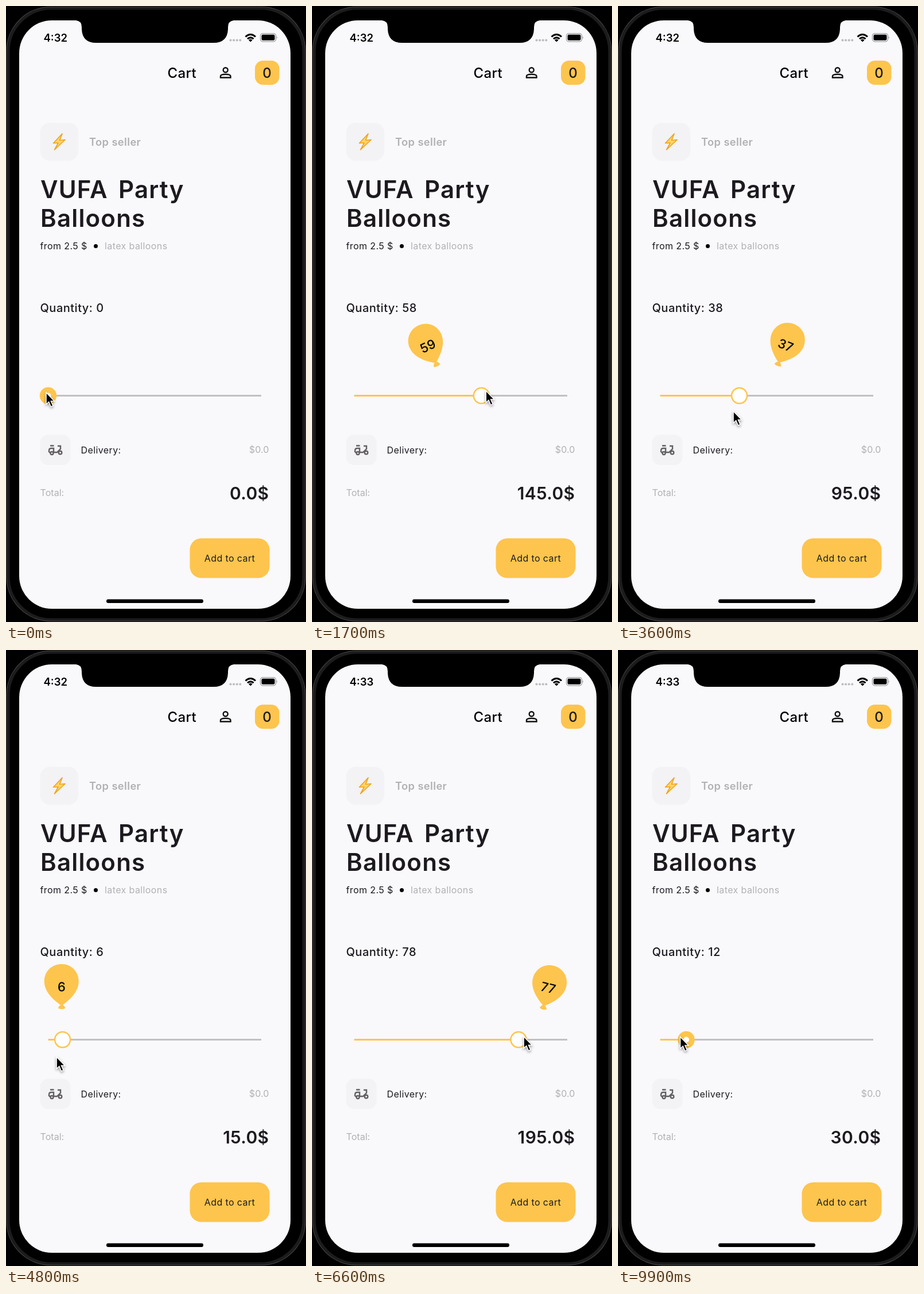
An HTML page that plays this animation: 523x1071 px, repeating every 10000 ms.

```html
<!DOCTYPE html>
<html lang="en">
<head>
<meta charset="utf-8">
<title>Balloon slider</title>
<style>
  html, body { margin: 0; width: 100%; height: 100%; overflow: hidden; background: #000; }
  svg { display: block; width: 523px; height: 1071px; }
  text { font: 400 16px Inter, sans-serif; letter-spacing: .4px; fill: #1c1a1f; white-space: pre; }
  .muted { fill: #b2b0b4; }
  .end { text-anchor: end; letter-spacing: .1px; }
  .mid { text-anchor: middle; letter-spacing: 0; }
  .title { font-size: 42px; font-weight: 600; letter-spacing: 1.2px; }
  .tile { fill: #f3f2f4; }
  .gold { fill: #fdc54d; }
  .line { fill: none; stroke-width: 2.4; }
</style>
</head>
<body>
<svg viewBox="0 0 523 1071">
  <!-- Phone -->
  <rect width="523" height="1071"/>
  <rect class="line" x="4" y="4" width="515" height="1063" rx="75" style="stroke:#1c1c1d;stroke-width:5"/>
  <rect class="line" x="1" y="1.5" width="521" height="1068" rx="77" style="stroke:#48484a;stroke-width:1.2"/>
  <rect x="23" y="25" width="473" height="1023" rx="57" fill="#f9f8fb"/>
  <path d="M122 24H397V25Q387 26 387 37V40Q386 64 362 64H157Q133 64 132 40V37Q132 26 122 25Z"/>
  <rect x="175" y="1031.5" width="169" height="6.5" rx="3.2"/>

  <!-- Status bar -->
  <text id="clock" x="65.5" y="62" style="font-size:18.5px;font-weight:600;letter-spacing:0;fill:#000"></text>
  <path d="M391.5 59.5H410" stroke="#bdbcbf" stroke-width="4.2" stroke-dasharray="0 5.6" stroke-linecap="round"/>
  <g fill="none" stroke="#000" stroke-width="3">
    <path d="M417.5 53.5Q426.300 45.500 435 53.500"/>
    <path d="M421 57.200Q426.300 52.500 431.600 57.200"/>
  </g>
  <path d="M426.300 62.500L423 59.200Q426.300 56.500 429.600 59.200Z"/>
  <rect x="443.500" y="47.800" width="27" height="14" rx="4" fill="none" stroke="#97969a" stroke-width="1.200"/>
  <rect x="445.500" y="49.800" width="23" height="10" rx="2.200"/>
  <path d="M471.800 52.500Q474 54.800 471.800 57Z" fill="#97969a"/>

  <!-- Header -->
  <text x="281.500" y="125" style="font-size:24px;font-weight:500;fill:#000">Cart</text>
  <g class="line" stroke="#111">
    <circle cx="382.700" cy="111.300" r="4"/>
    <path d="M374 124.500V122C374 117.600 391.500 117.600 391.500 122V124.500Z"/>
  </g>
  <rect class="gold" x="434" y="95" width="42.500" height="42" rx="14"/>
  <text class="mid" x="455" y="125" style="font-size:24px;font-weight:500">0</text>

  <!-- Product -->
  <rect class="tile" x="59.500" y="203" width="66.500" height="66" rx="17"/>
  <path d="M98 222L82.500 238.500L91 238L84.500 250L103 232.500L93.500 233.500Z" fill="#ffd56a" stroke="#eda51d" stroke-width="1.700" stroke-linejoin="round"/>
  <text class="muted" x="145" y="243" style="font-size:18.300px;font-weight:600">Top seller</text>
  <text class="title" x="60" y="334">VUFA</text>
  <text class="title" x="196" y="334">Party</text>
  <text class="title" x="60" y="384">Balloons</text>
  <text x="59.500" y="423">from 2.5 $</text>
  <circle cx="156.500" cy="417.500" r="3.500"/>
  <text class="muted" x="172" y="423">latex balloons</text>
  <text id="quantity" x="59.500" y="532" style="font-size:20px;font-weight:500;letter-spacing:.5px"></text>

  <!-- Delivery and total -->
  <rect class="tile" x="59.500" y="745.500" width="53" height="52.500" rx="14"/>
  <g class="line" stroke="#626064">
    <path d="M77 764.500H83.500M75 776V773Q75 769 79 769H83V776H89L95 770V765H90M75 776H78"/>
    <circle cx="80" cy="777.500" r="2.500"/>
    <circle cx="94.500" cy="776.500" r="2.800"/>
  </g>
  <text x="130.500" y="777.500">Delivery:</text>
  <text class="muted end" x="458.500" y="777">$0.0</text>
  <text class="muted" x="59.500" y="852" style="letter-spacing:.05px">Total:</text>
  <text id="total" class="end" x="458.500" y="858" style="font-size:30px;font-weight:600;letter-spacing:.4px"></text>
  <rect class="gold" x="320.500" y="925.500" width="139" height="69" rx="20"/>
  <text class="mid" x="390" y="966" style="letter-spacing:.4px">Add to cart</text>

  <!-- Slider -->
  <path d="M74 677.500H445" stroke="#c1c0c3" stroke-width="2.800"/>
  <path id="fill" stroke="#fdc54d" stroke-width="2.800"/>
  <g id="balloon">
    <path class="gold" d="M0-99C17-99 30-86 30-69C30-50 13-36 2-28Q6-25 6-22Q0-19-6-22Q-6-25-2-28C-13-36-30-50-30-69C-30-86-17-99 0-99Z"/>
    <text id="count" class="mid" y="-51.500" style="font-size:22px;font-weight:500;fill:#000"></text>
  </g>
  <g id="thumb">
    <circle class="gold" r="14.700"/>
    <circle id="hole" fill="#fff"/>
  </g>
  <path id="cursor" d="M0 0V20.500L4.700 16.300L8.300 24.800L12 23.200L8.400 15H14.500Z" stroke="#fff" stroke-width="1.500" style="filter:drop-shadow(0 2px 2px #0006)"/>
</svg>
<script>
const LOOP = 10000, LEFT = 73.5, WIDTH = 371.5;
const $ = id => document.getElementById(id);

// Each track is a list of [time, value] pairs.
const thumbX = [[0, 73.5], [950, 73.5], [1700, 295], [2250, 430], [2900, 430], [3600, 211.8],
  [4100, 98.6], [5100, 98.6], [5600, 305], [5950, 445], [6250, 445], [6600, 360],
  [7700, 360], [7950, 118.5], [LOOP, 119]];
const balloonX = [[950, 73.5], [1700, 227], [2500, 430], [2950, 430], [3600, 270.5], [4350, 97.3],
  [5100, 97.3], [5600, 238], [6150, 445], [6350, 445], [6800, 360]];
const openness = [[800, 0], [1050, 1], [7700, 1], [8000, .02], [8100, 0]];
const cursorDx = [[0, -3.5], [950, -3.5], [1700, 8], [2900, 6], [3600, -10.5], [5100, -10.5],
  [5600, 16.5], [6250, 12], [7700, 0], [7950, -10.5]];
const cursorY = [[0, 672], [1700, 669], [2900, 685], [3600, 704.5], [4800, 707.5], [5150, 700], [5600, 671.5], [8000, 672.5]];

function at(track, t) {
  const i = track.findIndex(key => key[0] > t);
  if (i < 0) return track.at(-1)[1];
  if (!i) return track[0][1];
  const [t0, a] = track[i - 1], [t1, b] = track[i];
  return a + (b - a) * (t - t0) / (t1 - t0);
}

const countAt = t => Math.floor((at(thumbX, Math.max(0, t)) - LEFT) / WIDTH * 100 + 1e-6);

function draw(t) {
  const x = at(thumbX, t), bx = at(balloonX, t), open = at(openness, t);
  const tilt = Math.max(-27, Math.min(27, (bx - x) * .37));
  const quantity = countAt(t - 15); // the labels trail the thumb slightly

  $('clock').textContent = t < 5000 ? '4:32' : '4:33';
  $('quantity').textContent = 'Quantity: ' + quantity;
  $('total').textContent = (quantity * 2.5).toFixed(1) + '$';
  $('count').textContent = countAt(t);
  $('fill').setAttribute('d', `M${LEFT} 677.5H${x}`);
  $('thumb').setAttribute('transform', `translate(${x} 677.5)`);
  $('hole').setAttribute('r', 5 + 7.2 * open);
  $('balloon').setAttribute('transform', `translate(${bx} 645) rotate(${tilt}) scale(${open})`);
  $('cursor').setAttribute('transform', `translate(${x + at(cursorDx, t)} ${at(cursorY, t)})`);
}

const start = performance.now();
function tick() {
  draw((performance.now() - start) % LOOP);
  requestAnimationFrame(tick);
}
tick();
</script>
</body>
</html>
```
